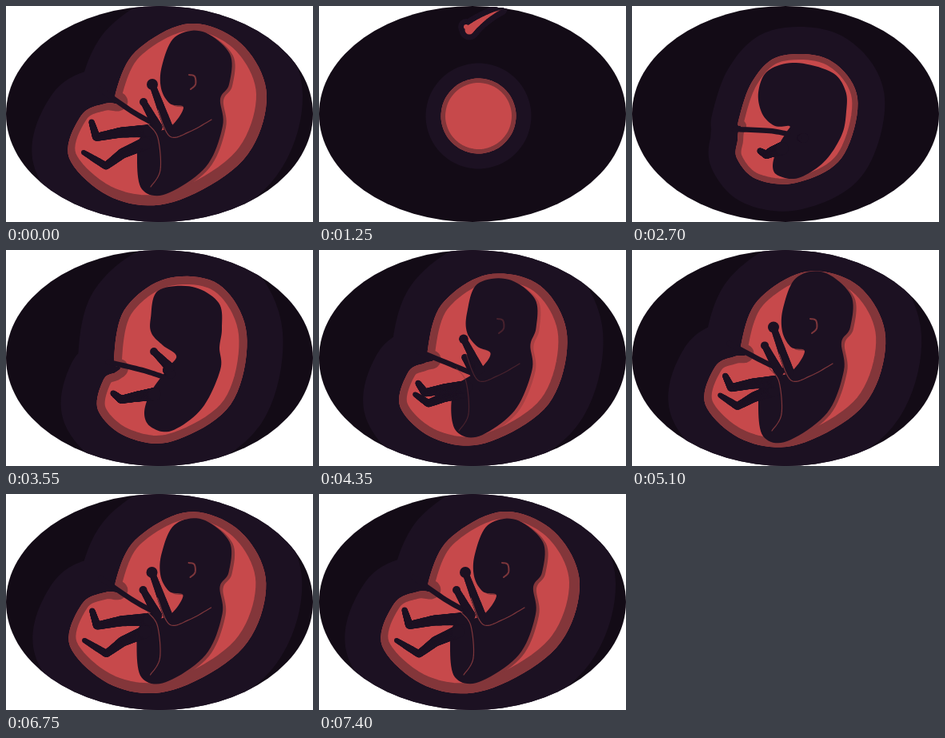
These frames come from a looping animation (384x270 px, 7450 ms). An HTML page with a canvas:

```html
<!DOCTYPE html>
<html lang="en">
<head>
<meta charset="utf-8">
<title>Growth</title>
<style>
html, body { margin: 0; width: 100%; height: 100%; overflow: hidden; background: #fff; }
canvas { display: block; width: 384px; height: 270px; }
</style>
</head>
<body>
<canvas id="stage" width="384" height="270"></canvas>
<script>
const ctx = document.getElementById('stage').getContext('2d');
const LOOP = 7450, STEP = 50, END = 7400;
const NIGHT = '#130b16', PLUM = '#1c1122', RED = '#c7494b', RIM = '#83363a', FINE = '#7d363b';

const clamp = v => Math.max(0, Math.min(1, v));
const easeOut = k => 1 - (1 - k) ** 2;
const span = (t, from, to) => clamp((t - from) / (to - from));
const mix = (a, b, k) => Array.isArray(a) ? a.map((v, i) => mix(v, b[i], k)) : a + (b - a) * k;
const pts = s => s.split(' ').map(p => p.split(',').map(Number));

// Key points of three ages: embryo, limb buds, grown
const ages = (...list) => list.map(pts);
const SAC = ages(
  '133,144 150,95 184,63 246,67 282,115 262,190 205,221 155,216 131,190 132,168 133,157 136,150',
  '135,137 148,75 200,36 266,43 301,105 281,193 208,239 150,233 115,200 122,162 137,153 143,147',
  '137,109 162,57 229,22 294,47 326,112 297,192 209,245 134,240 79,190 94,137 124,122 143,122');
const BODY = ages(
  '158,108 170,81 205,71 250,83 267,106 268,132 262,162 240,195 208,215 183,212 176,200 182,177 193,158 197,150 179,150 163,135',
  '181,85 190,51 233,46 266,66 270,98 267,122 268,150 245,198 207,226 181,221 173,203 182,176 204,146 213,132 196,119 182,104',
  '195,75 211,39 246,32 280,60 279,98 268,116 271,150 250,201 200,235 170,229 164,190 170,162 204,152 222,127 205,122 194,103');
const LEG = ages('160,181 168,186 176,182 188,178', '134,179 144,187 165,183 186,180', '107,145 113,164 144,158 180,156');
const FAR_LEG = [LEG[0], LEG[1], pts('97,183 125,200 146,184 174,172')];
const ARM = ages('210,165 215,165', '185,127 205,147', '183,98 203,152');
const FAR_ARM = ages('210,165 215,165', '200,150 206,155', '172,120 190,152');
const CORD = ages('128,154 172,156 195,160', '128,140 170,150 195,158', '118,104 158,132 185,147');

// One point every 200 ms from 50 ms
const SWIM = pts('16,110 58,200 150,248 260,250 326,185 272,10 188,30 186,95 199,130');

const EGG = Array.from(SAC[0], (_, i) => {
  const a = Math.PI * (.98 + i / 6);
  return [199.5 + 47 * Math.cos(a), 137.5 + 47 * Math.sin(a)];
});

function age([embryo, bud, grown], t) {
  return t < 3550 ? mix(embryo, bud, span(t, 2700, 3550))
    : mix(bud, grown, easeOut(span(t, 3550, END)));
}
// The trunk passes through a taller, more forward pose on its way
function trunk(list, t) {
  const tall = list[2].map(([x, y]) => [x - 6, 135 + (y - 135) * 1.04]);
  return t < 3550 ? age(list, t)
    : t < 5100 ? mix(list[1], tall, span(t, 3550, 5100))
    : mix(tall, list[2], easeOut(span(t, 5100, END)));
}

function spline(p, u, closed) {
  const n = p.length, i = Math.floor(u), f = u - i;
  const at = j => closed ? p[(j + n) % n] : p[Math.max(0, Math.min(n - 1, j))];
  const [a, b, d, e] = [at(i - 1), at(i), at(i + 1), at(i + 2)];
  return [0, 1].map(c => b[c] + f * (d[c] - a[c] +
    f * (2 * a[c] - 5 * b[c] + 4 * d[c] - e[c] + f * (3 * (b[c] - d[c]) + e[c] - a[c]))) / 2);
}
function curve(p, closed) {
  const path = new Path2D();
  const end = closed ? p.length : p.length - 1;
  for (let u = 0; u < end + .01; u += .1) path.lineTo(...spline(p, Math.min(u, end), closed));
  if (closed) path.closePath();
  return path;
}
function fill(path, color) {
  ctx.fillStyle = color;
  ctx.fill(path);
}
function line(path, color, width) {
  ctx.strokeStyle = color;
  ctx.lineWidth = width;
  ctx.stroke(path);
}
function disc([x, y], r, color) {
  const path = new Path2D();
  path.arc(x, y, r, 0, 7);
  fill(path, color);
}
// Tapered limb from its tip to its root
function limb(p, tip, root) {
  const last = p.length - 1;
  for (let u = 0; u < last; u += .03) {
    const i = Math.floor(u);
    disc(mix(p[i], p[i + 1], u - i), tip + (root - tip) * u / last, PLUM);
  }
}

function swimmer(t, grow, color) {
  const at = time => spline(SWIM, Math.max(0, (time - 50) / 200));
  const [x, y] = at(t);
  disc([x - 4, y - 4], 3 + grow, color);
  for (let k = 0; k <= 1; k += .02) disc(at(t - 105 * k), 5.5 * (1 - k) + grow, color);
}

function child(t, sac) {
  const body = curve(trunk(BODY, t), true);
  const late = span(t, 3900, 4900);
  const limbs = span(t, 2700, 3550);
  const size = Math.max(.02, span(t, 1600, 2700) ** 1.5);

  ctx.save();
  ctx.clip(sac);
  ctx.globalAlpha = late;
  ctx.translate(4, 2);
  fill(body, RIM);
  ctx.restore();

  ctx.save();
  ctx.translate(200, 140);
  ctx.scale(size, size);
  ctx.translate(-200, -140);
  fill(body, PLUM);
  limb(age(FAR_LEG, t), 3, 8);
  limb(age(LEG, t), 3.5, 8);
  line(curve(age(CORD, t)), PLUM, 6.5);
  for (const [list, hand] of [[FAR_ARM, 5], [ARM, 7]]) {
    const arm = trunk(list, t);
    limb(arm, 4, 6);
    disc(arm[0], hand * (.4 + .3 * limbs + .3 * late), PLUM);
  }
  ctx.restore();

  ctx.save();
  ctx.globalAlpha = late;
  ctx.translate(-6 * (1 - easeOut(span(t, 5100, END))), 0);
  line(curve(pts('229,86 236,88 237,98 231,104')), FINE, 2);
  line(curve(pts('190,130 205,163 230,157 257,142')), FINE, 1.2);
  line(curve(pts('178,148 190,165 193,205 181,226')), FINE, 1.2);
  ctx.restore();
}

function draw(t) {
  if (t < 50) t = END;
  const sac = curve(mix(EGG, age(SAC, t), span(t, 2250, 2700)), true);
  const swell = span(t, 2250, 3550), late = easeOut(span(t, 3550, END));

  ctx.clearRect(0, 0, 384, 270);
  ctx.save();
  ctx.lineJoin = ctx.lineCap = 'round';
  ctx.beginPath();
  ctx.ellipse(192, 135, 192, 135, 0, 0, 7);
  ctx.fillStyle = NIGHT;
  ctx.fill();
  ctx.clip();

  line(sac, PLUM, 2 * (19 + 26 * easeOut(swell)));
  if (t < 1550) {
    swimmer(t, 7, PLUM);
    swimmer(t, 0, RED);
  }
  fill(sac, RED);

  // Inner rim, thinner towards the upper left
  ctx.save();
  ctx.clip(sac);
  ctx.translate(-2 * late, -2 * late);
  line(sac, RIM, 2 * (5.5 + 4.5 * swell + late));
  ctx.restore();

  if (t >= 1600) child(t, sac);
  ctx.restore();
}

const start = performance.now();
function tick() {
  const t = (performance.now() - start) % LOOP;
  draw(Math.floor(t / STEP) * STEP);
  requestAnimationFrame(tick);
}
tick();
</script>
</body>
</html>
```
